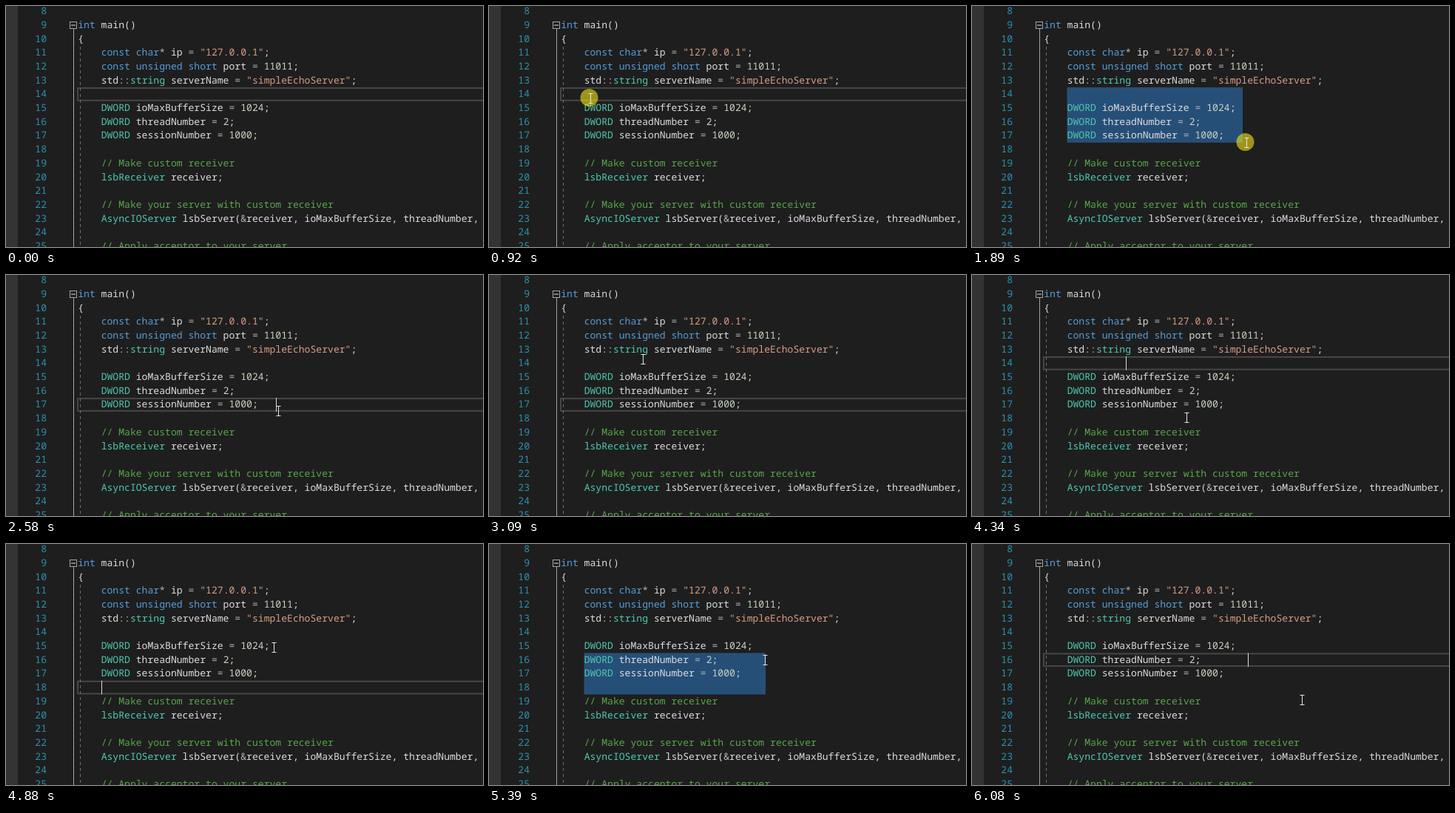
An HTML page that plays this animation: 645x326 px, repeating every 6180 ms.

```html
<!DOCTYPE html>
<html>
<head>
<meta charset="utf-8">
<style>
html, body { margin: 0; width: 100%; height: 100%; overflow: hidden; background: #1e1e1e; }
svg { display: block; }
text { font: 500 13.1px "Noto Sans Mono", "DejaVu Sans Mono", monospace; white-space: pre; text-rendering: geometricPrecision; }
</style>
</head>
<body>
<svg id="stage" width="645" height="326" viewBox="0 0 645 326">
  <rect width="16" height="326" fill="#333"/>
  <rect id="current" x="97" width="560" height="16.7" fill="none" stroke="#464646" stroke-width="2"/>
  <rect id="selection" fill="#264f78"/>
  <g fill="none" stroke="#a5a5a5">
    <rect x="86.5" y="21.5" width="9" height="9"/>
    <path d="M88 26H94" stroke="#dcdcdc"/>
    <path d="M91.5 31V326"/>
    <path d="M100.5 55V326" stroke="#707070" stroke-dasharray="4 4"/>
  </g>
  <g id="code"></g>
  <rect id="caret" width="1"/>
  <circle id="click" r="12" fill="rgb(255,240,20)" fill-opacity=".57"/>
  <path id="beam" d="M-3-6.5H3M0-6.5V6.5M-3 6.5H3" fill="none" stroke="#e6e6e6"/>
  <path id="arrow" d="M0 0V16L3.7 12.6 6.2 18.4 8.9 17.2 6.4 11.6H11.5Z" fill="#fff" stroke="#111" stroke-width=".8"/>
</svg>
<script>
const LOOP = 6180, FIRST = 8;
const lines = [
  '',
  'int main()',
  '{',
  '    const char* ip = "127.0.0.1";',
  '    const unsigned short port = 11011;',
  '    std::string serverName = "simpleEchoServer";',
  '',
  '    DWORD ioMaxBufferSize = 1024;',
  '    DWORD threadNumber = 2;',
  '    DWORD sessionNumber = 1000;',
  '',
  '    // Make custom receiver',
  '    lsbReceiver receiver;',
  '',
  '    // Make your server with custom receiver',
  '    AsyncIOServer lsbServer(&receiver, ioMaxBufferSize, threadNumber,',
  '',
  '    // Apply acceptor to your server'
];

// comment, string, keyword, type, number, operator
const token = /(\/\/.*)|("[^"]*")|\b(int|const|char|unsigned|short)\b|\b(string|DWORD|lsbReceiver|AsyncIOServer)\b|\b(\d+)|(::|[*=&])/g;
const colors = ['#57a64a', '#d69d85', '#569cd6', '#4ec9b0', '#c8d2c0', '#b4b4b4'];

const $ = id => document.getElementById(id);
const set = (el, attrs) => { for (const k in attrs) el.setAttribute(k, attrs[k]); };
const show = (el, on) => el.setAttribute('visibility', on ? 'visible' : 'hidden');
const lineTop = n => 110 + 18.7 * (n - 14);

function add(parent, tag, attrs, text) {
  const el = document.createElementNS('http://www.w3.org/2000/svg', tag);
  set(el, attrs);
  if (text) el.textContent = text;
  return parent.appendChild(el);
}

lines.forEach((line, i) => {
  const n = FIRST + i, y = Math.round(lineTop(n) + 13.35);
  add($('code'), 'text', { x: 55, y, 'text-anchor': 'end', fill: '#2b91af' }, String(n));
  const body = line.trimStart();
  const row = add($('code'), 'text', { x: 97.2 + 7.86 * (line.length - body.length), y, fill: '#dcdcdc' });
  let last = 0;
  for (const m of body.matchAll(token)) {
    row.append(body.slice(last, m.index));
    add(row, 'tspan', { fill: colors[m.slice(1).findIndex(Boolean)] }, m[0]);
    last = m.index + m[0].length;
  }
  row.append(body.slice(last));
});

// Editor states; sel: [x0, x1, first, last line], caret: [x, first, last line, color]
const states = [
  { at: 0, line: 14 },
  { at: 970, line: 14, caret: [129, 14, 14] },
  { at: 1890, sel: [128.5, 365, 14, 17], caret: [365, 14, 17, '#264f78'] },
  { at: 2580, line: 17, caret: [365, 17, 17] },
  { at: 3550, sel: [207.5, 364.5, 14, 17], caret: [207.5, 14, 14, '#6b2f4f'] },
  { at: 4060, line: 14, caret: [208, 14, 14] },
  { at: 4420, line: 18, caret: [129, 18, 18] },
  { at: 5340, sel: [128.5, 373, 16, 18], caret: [373, 16, 18, '#264f78'] },
  { at: 5670, line: 16, caret: [373, 16, 16] }
];
const BLINK = 510;
const clicks = [[920, 970], [1890, 1970], [3550, 3600], [4420, 4470], [5340, 5390]];

// Pointer moves: start, end, x, y, steps
const moves = [
  [180, 310, 75, 104, 4],
  [490, 920, 137, 124, 9],
  [1150, 1660, 371, 184, 11],
  [2580, 3090, 208, 113, 12],
  [3780, 3910, 249, 158, 3],
  [3957, 4340, 290, 192, 9],
  [4470, 4880, 362, 139, 10],
  [4930, 5030, 365, 140, 3],
  [5080, 5290, 373, 156, 6],
  [5670, 6080, 445.5, 210, 9]
];

function pointer(t) {
  let x = 494, y = 307;
  for (const [t0, t1, x1, y1, n] of moves) {
    if (t < t0) break;
    const step = Math.floor((t - t0) / (t1 - t0) * (n - 1) + 1e-6);
    // the opening sweep is first seen at its start point
    const p = Math.min(1, t0 === 180 ? step / (n - 1) : (step + 1) / n);
    const e = p * p * (3 - 2 * p);
    x += (x1 - x) * e;
    y += (y1 - y) * e;
  }
  return [Math.round(x), Math.round(y)];
}

function draw(t) {
  const { at, line, sel, caret } = states.findLast(s => s.at <= t);
  show($('current'), line);
  if (line) set($('current'), { y: lineTop(line) + 1 });

  show($('selection'), sel);
  if (sel) {
    const [x0, x1, a, b] = sel, y = lineTop(a);
    set($('selection'), { x: x0, y, width: x1 - x0, height: lineTop(b + 1) - y });
  }

  show($('caret'), caret && t < at + BLINK);
  if (caret) {
    const [x, a, b, fill = '#dcdcdc'] = caret, y = lineTop(a);
    set($('caret'), { x, y, height: lineTop(b + 1) - y, fill });
  }

  const [x, y] = pointer(t), seen = t >= 180, margin = x < 86;
  const inside = sel && x > sel[0] + 1 && x < sel[1] && y > lineTop(sel[2]) && y < lineTop(sel[3] + 1);
  const arrow = margin || inside;
  show($('arrow'), seen && arrow);
  show($('beam'), seen && !arrow);
  set($('arrow'), { transform: `translate(${x} ${y})` + (margin ? ' scale(-1 1)' : '') });
  set($('beam'), { transform: `translate(${x + .5} ${y + 1})` });
  show($('click'), clicks.some(([a, b]) => t >= a && t < b));
  set($('click'), { cx: x - 1.5, cy: y });
}

const start = performance.now();
function tick() {
  draw((performance.now() - start) % LOOP);
  requestAnimationFrame(tick);
}
tick();
</script>
</body>
</html>
```
